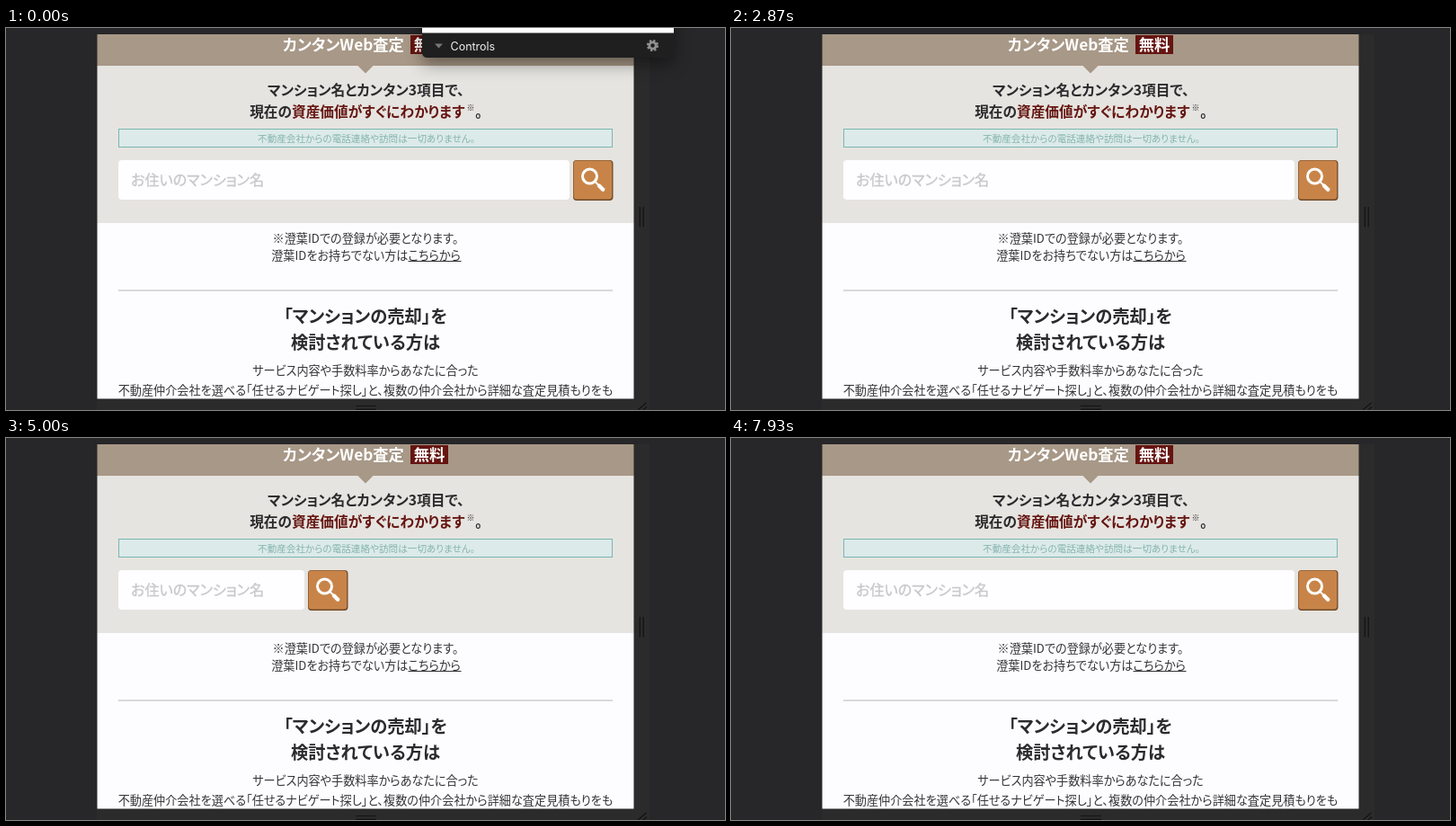
An HTML page that plays this animation: 800x425 px, repeating every 8000 ms.

```html
<!DOCTYPE html>
<html lang="ja">
<head>
<meta charset="utf-8">
<title>マンション査定</title>
<style>
  html, body { margin: 0; width: 100%; height: 100%; overflow: hidden; background: #272628; }
  svg { display: block; width: 800px; height: 425px; }
  text {
    font-family: "Noto Sans CJK JP", "Noto Sans CJK", sans-serif;
    font-feature-settings: "palt", "kern";
    fill: #2b2a2c;
  }
  .mid { text-anchor: middle; }
  .end { text-anchor: end; }
  .title { font-size: 17.3px; font-weight: 700; fill: #fff; }
  .lead { font-size: 15.7px; font-weight: 700; }
  .heading { font-size: 19.3px; font-weight: 700; }
  .body { font-size: 13.15px; fill: #353436; }
  .notice { font-size: 10.6px; fill: #84b4af; }
  .hint { font-size: 16.1px; fill: #c9c8ca; stroke: #c9c8ca; stroke-width: .4px; }
  .red { fill: #651511; }
  .grip { stroke: #121213; stroke-width: 1.2; fill: none; }
  #panel { filter: drop-shadow(0 7px 9px rgba(0, 0, 0, .4)); }
</style>
</head>
<body>
<svg viewBox="0 0 800 425">
  <!-- Page -->
  <rect x="100" width="600" height="425" fill="#fdfcfe"/>
  <rect x="100" y="42" width="600" height="175" fill="#e6e4e0"/>
  <path d="M100 0h600v42H408.500l-8.500 8.500-8.500-8.500H100z" fill="#a89887"/>

  <text class="title" x="308" y="25">カンタンWeb査定</text>
  <rect x="450" y="8" width="42" height="21" fill="#651511"/>
  <text class="title mid" x="471" y="25">無料</text>

  <text class="lead mid" x="400.500" y="75">マンション名とカンタン3項目で、</text>
  <text class="lead end" x="318" y="99">現在の</text>
  <text class="lead red" x="318" y="99">資産価値がすぐにわかります</text>
  <text x="512.500" y="92" font-size="9">※</text>
  <text class="lead" x="522" y="99">。</text>

  <rect x="125.500" y="112.500" width="549" height="20" fill="#dceae9" stroke="#79b6b1"/>
  <text class="notice mid" x="401" y="127">不動産会社からの電話連絡や訪問は一切ありません。</text>

  <rect id="field" x="125" y="147" width="502" height="44" rx="4" fill="#fefdff"/>
  <text class="hint" x="139" y="175">お住いのマンション名</text>

  <g id="button">
    <rect width="44.500" height="45" rx="4" fill="#6e4a2a"/>
    <rect x=".6" y=".5" width="42.600" height="43" rx="3.500" fill="#c88448"/>
    <g fill="none" stroke="#fff" stroke-linecap="round">
      <circle cx="18.500" cy="18" r="8" stroke-width="3"/>
      <path d="M24.500 24l3 3" stroke-width="2"/>
      <path d="M29 28.500l4.200 4.200" stroke-width="4.400"/>
    </g>
  </g>

  <text class="body mid" x="400" y="238.500">※澄葉IDでの登録が必要となります。</text>
  <text class="body end" x="447.500" y="257.500">澄葉IDをお持ちでない方は</text>
  <text class="body" x="447.500" y="257.500">こちらから</text>
  <path d="M447.500 259.500h59" stroke="#353436"/>

  <rect x="125" y="291" width="550" height="2" fill="#d9d8da"/>
  <text class="heading mid" x="400" y="328">「マンションの売却」を</text>
  <text class="heading mid" x="400" y="356.500">検討されている方は</text>
  <text class="body mid" x="400" y="386">サービス内容や手数料率からあなたに合った</text>
  <text class="body mid" x="400" y="407.500">不動産仲介会社を選べる「任せるナビゲート探し」と、複数の仲介会社から詳細な査定見積もりをも</text>

  <!-- Preview frame and resize handles -->
  <path fill-rule="evenodd" d="M0 0h800v425H0zM101.500 7v405.500h597V7z" fill="#272628"/>
  <path d="M699 7h17v418H101v-12h598z" fill="#2b2b2c"/>
  <path class="grip" d="M705.300 199v22.500M709.200 199v22.500M389 420.500h23M389 424.300h23M703 425l9.500-8M709 425l4-3.500"/>

  <g id="panel">
    <path d="M463-40h280v67q0 6-6 6H469q-6 0-6-6z" fill="#1f1f20"/>
    <rect x="463" y="-40" width="280" height="45.500" fill="#fff"/>
    <path d="M477 17.500h9l-4.500 5z" fill="#777"/>
    <text x="494.500" y="24.800" font-size="12.500" style="font-family:Inter,sans-serif;fill:#eee">Controls</text>
    <g fill="none" stroke="#929293">
      <circle cx="719.500" cy="19.500" r="3.700" stroke-width="2.800"/>
      <circle cx="719.500" cy="19.500" r="5.500" stroke-width="2.200" stroke-dasharray="2.300 2.020"/>
    </g>
  </g>
</svg>
<script>
  const LOOP = 8000;
  const TOGGLES = [800, 1835, 2950, 3950, 5000, 6035, 6900, 7750];
  const PANEL_LEAVES = 70, PANEL_GONE = 300;
  const [field, button, panel] = ["field", "button", "panel"].map(id => document.getElementById(id));

  function draw(time) {
    const narrow = TOGGLES.filter(at => time >= at).length % 2 === 1;
    field.setAttribute("width", narrow ? 207 : 502);
    button.setAttribute("transform", `translate(${narrow ? 336 : 631} 147)`);

    const progress = Math.max(0, (time - PANEL_LEAVES) / (PANEL_GONE - PANEL_LEAVES));
    panel.setAttribute("transform", `translate(0 ${-60 * progress})`);
    panel.setAttribute("visibility", progress < 1 ? "visible" : "hidden");
  }

  const start = performance.now();
  function tick() {
    draw((performance.now() - start) % LOOP);
    requestAnimationFrame(tick);
  }
  tick();
</script>
</body>
</html>
```
